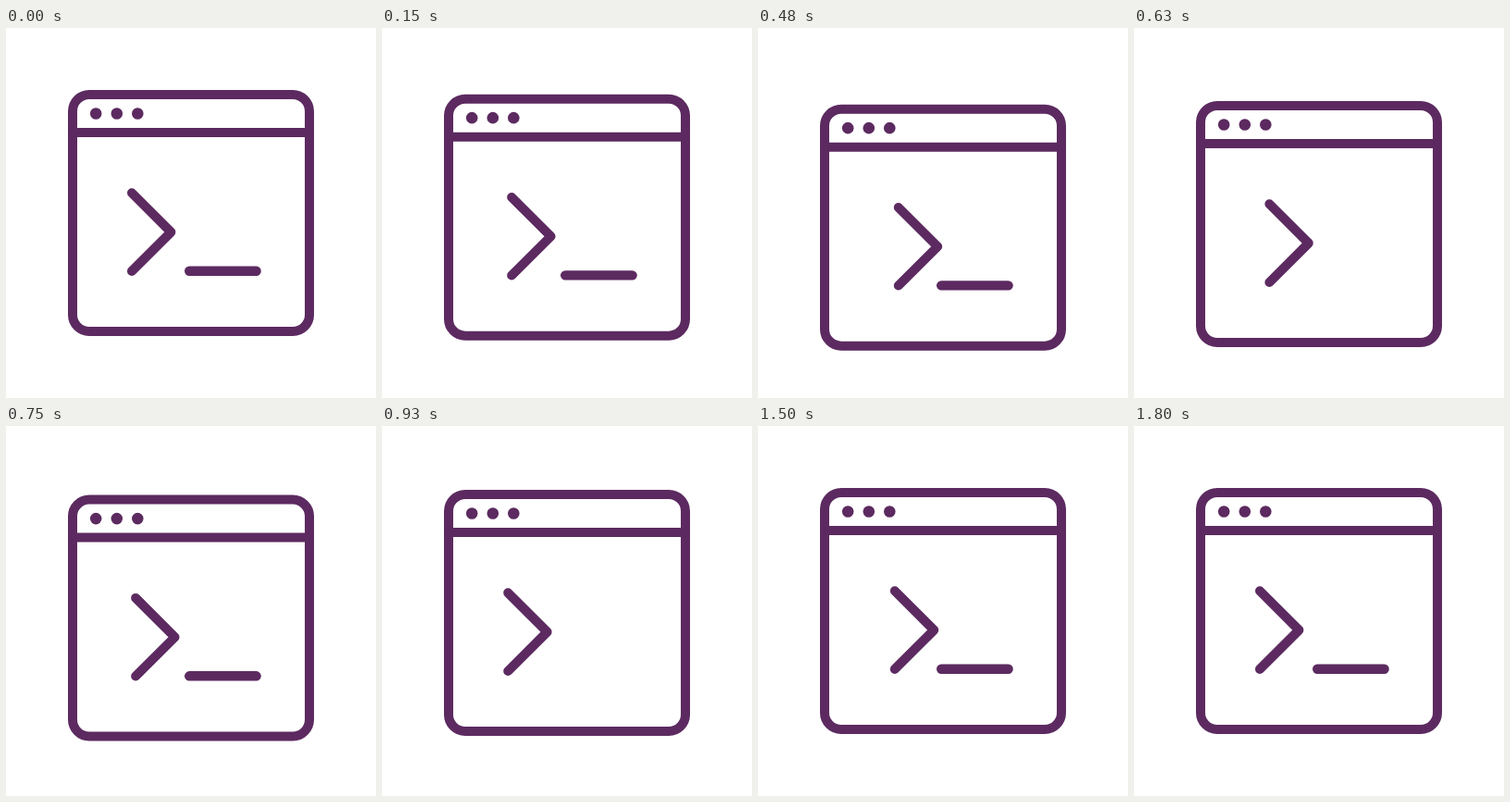
An HTML page for the animation above (3.83 s loop, 400 by 400 pixels).

```html
<!DOCTYPE html>
<html lang="en">
<head>
<meta charset="utf-8">
<title>Terminal window</title>
<style>
  html, body { margin: 0; width: 100%; height: 100%; overflow: hidden; background: #fff; }
  svg { display: block; width: 100%; height: 100%; }
  .lines { fill: none; stroke: #5c2a60; stroke-width: 10; stroke-linecap: round; stroke-linejoin: round; }
  .dots { fill: #5c2a60; stroke: none; }
</style>
</head>
<body>
<svg viewBox="0 0 400 400">
  <g id="terminal" class="lines">
    <rect x="72" y="72" width="256" height="256" rx="18"/>
    <path d="M72 113H328"/>
    <g class="dots">
      <circle cx="97.2" cy="92.5" r="6.3"/>
      <circle cx="119.8" cy="92.5" r="6.3"/>
      <circle cx="142.3" cy="92.5" r="6.3"/>
    </g>
    <path id="prompt" d="M136 178.3L178.4 220.6L136 262.9"/>
    <path id="cursor" d="M198.2 262.7H270.6" stroke-width="10.4"/>
  </g>
</svg>
<script>
const LOOP = 3830, ACTIVE = 1800, STEP = 30;
const DROP = 16, PUSH = 16, BLINK = 180;
const [terminal, prompt_, cursor] =
  ["terminal", "prompt", "cursor"].map(id => document.getElementById(id));

const clamp = x => Math.min(1, Math.max(0, x));
const smooth = x => x * x * (3 - 2 * x);

// Ease with a quick middle and a longer tail: cubic-bezier(1/3, 0, 0.55, 1).
function settle(x) {
  let low = 0, high = 1;
  for (let i = 0; i < 20; i++) {
    const s = (low + high) / 2, r = 1 - s;
    if (r * r * s + 1.65 * r * s * s + s ** 3 < x) low = s; else high = s;
  }
  return smooth((low + high) / 2);
}

function windowDrop(t) {
  if (t < 420) return DROP * smooth(t / 420);
  return t < 1120 ? DROP * (1 - settle((t - 420) / 700)) : 0;
}

function promptPush(t) {
  const phase = (t % 900) / 450;
  return PUSH * smooth(clamp(phase < 1 ? phase : 2 - phase));
}

function draw(now) {
  const t = Math.min(ACTIVE, Math.floor((now % LOOP) / STEP) * STEP);
  const lit = t >= 8 * BLINK || Math.floor(t / BLINK) % 2 === 0;
  terminal.setAttribute("transform", `translate(0 ${windowDrop(t)})`);
  prompt_.setAttribute("transform", `translate(${promptPush(t)} 0)`);
  cursor.setAttribute("visibility", lit ? "visible" : "hidden");
}

const start = performance.now();
function tick() {
  draw(performance.now() - start);
  requestAnimationFrame(tick);
}
tick();
</script>
</body>
</html>
```
